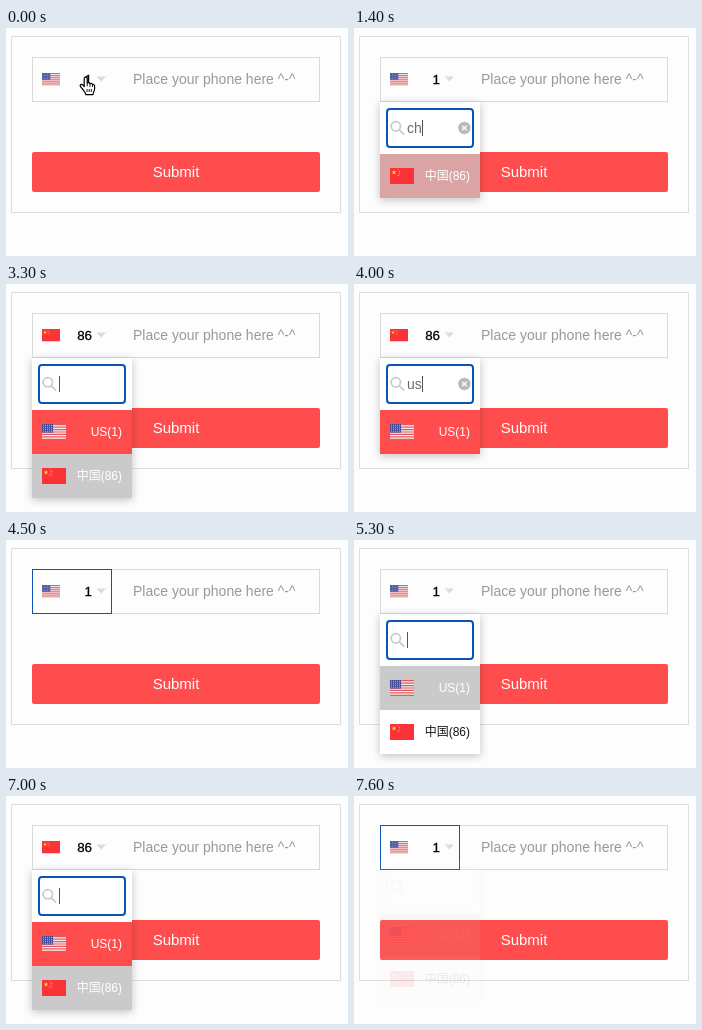
An HTML page that plays this animation: 342x228 px, repeating every 7.7 s.

```html
<!DOCTYPE html>
<html lang="en">
<head>
<meta charset="utf-8">
<title>Phone field</title>
<style>
  html, body { margin: 0; width: 100%; height: 100%; overflow: hidden; background: #fdfdfd; }
  svg { display: block; width: 100vw; height: 100vh; }
  text { font-family: "Liberation Sans", "Noto Sans CJK SC", "Noto Sans CJK", sans-serif; }
  #panel-bg { filter: drop-shadow(0 2px 4px rgba(0, 0, 0, .24)); }
</style>
</head>
<body>
<svg viewBox="0 0 342 228" xmlns="http://www.w3.org/2000/svg">
  <defs>
    <symbol id="us" viewBox="0 0 24 16" preserveAspectRatio="none">
      <rect width="24" height="16" fill="#f6eeee"/>
      <path id="stripes" stroke="#e25a5f" stroke-width="1.23"/>
      <rect width="11" height="8.6" fill="#46509a"/>
      <path id="dots" stroke="#e4e6f2" stroke-width=".8" stroke-dasharray=".8 1.2"/>
    </symbol>
    <symbol id="cn" viewBox="0 0 24 16" preserveAspectRatio="none">
      <rect width="24" height="16" fill="#fb3238"/>
      <g id="stars" fill="#ffd23c"></g>
    </symbol>
  </defs>

  <rect width="342" height="228" fill="#fdfdfd"/>
  <rect x="5.5" y="8.5" width="329" height="176" fill="none" stroke="#dedede"/>
  <rect x="26.5" y="29.5" width="287" height="44" fill="none" stroke="#dadada"/>
  <rect id="ring" x="26.5" y="29.5" width="79" height="44" fill="none" stroke="#0d55b5"/>
  <use id="flag" x="36" y="45" width="18" height="12.5"/>
  <text id="code" x="86" y="56" font-size="13.33" text-anchor="end" stroke="#000" stroke-width=".3"></text>
  <path d="M90.5 48.5h9.5l-4.75 5z" fill="#dcdcdc"/>
  <text x="127" y="56" font-size="14" fill="#999">Place your phone here ^-^</text>
  <rect x="26" y="124" width="288" height="40" rx="2" fill="#ff4d4d"/>
  <text x="170" y="149" font-size="15" text-anchor="middle" fill="#fff">Submit</text>

  <g id="panel">
    <rect id="panel-bg" x="26" y="74" width="100" fill="#fff"/>
    <rect id="field" fill="#fff"/>
    <g fill="none" stroke="#cacaca" stroke-width="1.7">
      <circle cx="41.8" cy="98.3" r="4.7"/>
      <path d="M45.3 101.8l4.9 4.9"/>
    </g>
    <text id="query" x="53" y="105" font-size="14" fill="#666b78"></text>
    <path id="caret" stroke="#555" stroke-width="1"/>
    <g id="clear">
      <circle cx="110.4" cy="100" r="6.2" fill="#b9b9b9"/>
      <path d="M108.1 97.7l4.6 4.6m0-4.6l-4.6 4.6" stroke="#fff" stroke-width="1.3"/>
    </g>
    <g id="rows"></g>
  </g>

  <g id="hand" transform="translate(73 48)">
    <path d="M5.2 10.6V2.6C5.2.6 8.2.6 8.2 2.6V7C9.2 6.3 10.8 6.6 11 7.7C12 7.1 13.3 7.5 13.5 8.6C14.6 8.2 15.6 8.8 15.6 10V13C15.6 15 14 16 14 18.6H6.8C6.6 16.4 4.4 14.6 3 12.4C2.2 11.2 1.2 10.4 1.1 9.5C1.4 8 3.2 8.2 4 9.2Z"
      fill="#fff" stroke="#000" stroke-width="1.2" stroke-linejoin="round"/>
    <path d="M8.2 7v3.4M11 7.8v3M13.5 8.8v2.2M8 13v3M10.2 13v3M12.3 13v3" stroke="#000" stroke-width=".9"/>
  </g>
</svg>

<script>
const LOOP = 7700, FADE = 300, BLINK = 530;
const WHITE = [255, 255, 255], GRAY = [202, 202, 202], RED = [255, 77, 77];
const ITEMS = {
  us: { code: "1", label: "US(1)" },
  cn: { code: "86", label: "中国(86)" }
};
// Each visit: panel opens, optional typing, an item is picked.
const VISITS = [
  { open: 250, pick: 2510, item: "cn", keys: [[1290, "c"], [1390, "ch"]] },
  { open: 3000, pick: 4200, item: "us", keys: [[3680, "u"], [3880, "us"]] },
  { open: 4780, pick: 6080, item: "cn", keys: [] },
  { open: 6450, pick: 7410, item: "us", keys: [] }
];
const FILLS = [
  [[-FADE, GRAY], [1340, RED], [4200, GRAY], [6080, RED], [7410, GRAY]],
  [[-FADE, WHITE], [2510, GRAY], [4200, WHITE], [5450, RED], [6080, GRAY], [7410, WHITE]]
];

const $ = id => document.getElementById(id);
const set = (el, attrs) => { for (const k in attrs) el.setAttribute(k, attrs[k]); };
const show = (el, on) => set(el, { visibility: on ? "inherit" : "hidden" });
const last = (list, test) => list.filter(test).pop();

// CSS "ease": cubic-bezier(.25, .1, .25, 1)
function ease(x) {
  if (x <= 0) return 0;
  if (x >= 1) return 1;
  const bez = (a, b, s) => 3 * a * s * (1 - s) ** 2 + 3 * b * s * s * (1 - s) + s ** 3;
  let lo = 0, hi = 1;
  for (let i = 0; i < 20; i++) {
    const mid = (lo + hi) / 2;
    if (bez(.25, .25, mid) < x) lo = mid; else hi = mid;
  }
  return bez(.1, 1, lo);
}

const mix = (a, b, p) => a.map((v, i) => Math.round(v + (b[i] - v) * p));
const rgb = c => `rgb(${c})`;

function fillAt(steps, t) {
  const i = steps.filter(s => s[0] <= t).length - 1;
  const [start, to] = steps[i];
  return mix(steps[Math.max(0, i - 1)][1], to, ease((t - start) / FADE));
}

function star(x, y, r) {
  const pts = Array.from({ length: 10 }, (_, i) => {
    const a = i * Math.PI / 5, d = i % 2 ? r * .4 : r;
    return [x + d * Math.sin(a), y - d * Math.cos(a)].map(v => v.toFixed(2));
  });
  return `<polygon points="${pts.join(" ")}"/>`;
}

function lines(n, first, gap, x, w) {
  return Array.from({ length: n }, (_, i) => `M${x} ${first + i * gap}h${w}`).join("");
}

set($("stripes"), { d: lines(7, .615, 2.46, 0, 24) });
set($("dots"), { d: lines(4, 1.3, 2, 1, 9.5) });
$("stars").innerHTML = star(4, 4.4, 2.5) +
  [[8, 1.7], [9.6, 3.4], [9.6, 5.8], [8, 7.4]].map(([x, y]) => star(x, y, .9)).join("");

$("rows").innerHTML = [0, 1].map(i => `<g transform="translate(26 ${126 + 44 * i})">
  <rect width="100" height="44"/><use x="10" y="14" width="24" height="16"/>
  <text x="90" y="26" font-size="12" text-anchor="end"></text></g>`).join("");
const rows = [...$("rows").children].map(g => {
  const [rect, flag, label] = g.children;
  return { g, rect, flag, label };
});

function drawRow(i, name, t) {
  const { g, rect, flag, label } = rows[i];
  show(g, !!name);
  if (!name) return;
  const fill = fillAt(FILLS[i], t);
  const ink = FILLS[i].map(([s, c]) => [s, c === WHITE ? [20, 20, 20] : WHITE]);
  set(rect, { fill: rgb(fill) });
  set(flag, { href: "#" + name });
  set(label, { fill: rgb(fillAt(ink, t)) });
  label.textContent = ITEMS[name].label;
}

function draw(t) {
  const visit = last(VISITS, v => t >= v.open);
  const done = last(VISITS, v => t >= v.pick);
  const chosen = done ? done.item : "us";
  const isOpen = !!visit && t < visit.pick;

  show($("hand"), t < 200);
  show($("ring"), done && !isOpen);
  set($("flag"), { href: "#" + chosen });
  $("code").textContent = ITEMS[chosen].code;

  let vis = 0;
  if (visit) vis = isOpen ? ease((t - visit.open) / FADE) : 1 - ease((t - visit.pick) / FADE);
  set($("panel"), {
    opacity: vis,
    transform: `translate(0 ${-10 * (1 - vis)})`,
    visibility: vis > 0 ? "visible" : "hidden"
  });
  if (!vis) return;

  const key = isOpen && last(visit.keys, k => t >= k[0]);
  const query = key ? key[1] : "";
  const list = query ? [visit.item] : ["us", "cn"];
  set($("panel-bg"), { height: 52 + 44 * list.length });
  set($("field"), isOpen
    ? { x: 33, y: 81, width: 86, height: 38, rx: 3, stroke: "#0a53b8", "stroke-width": 2 }
    : { x: 32.5, y: 80.5, width: 87, height: 39, rx: 1, stroke: "#d4d4d4", "stroke-width": 1 });
  $("query").textContent = query;
  show($("clear"), query);

  const since = t - (key ? key[0] : visit.open + 200);
  const x = query ? 53.5 + $("query").getComputedTextLength() : 53.5;
  set($("caret"), { d: `M${Math.floor(x) + .5} 92v16` });
  show($("caret"), isOpen && since >= 0 && since % (2 * BLINK) < BLINK);

  rows.forEach((_, i) => drawRow(i, list[i], t));
}

const began = performance.now();
function tick() {
  draw((performance.now() - began) % LOOP);
  requestAnimationFrame(tick);
}
tick();
</script>
</body>
</html>
```
